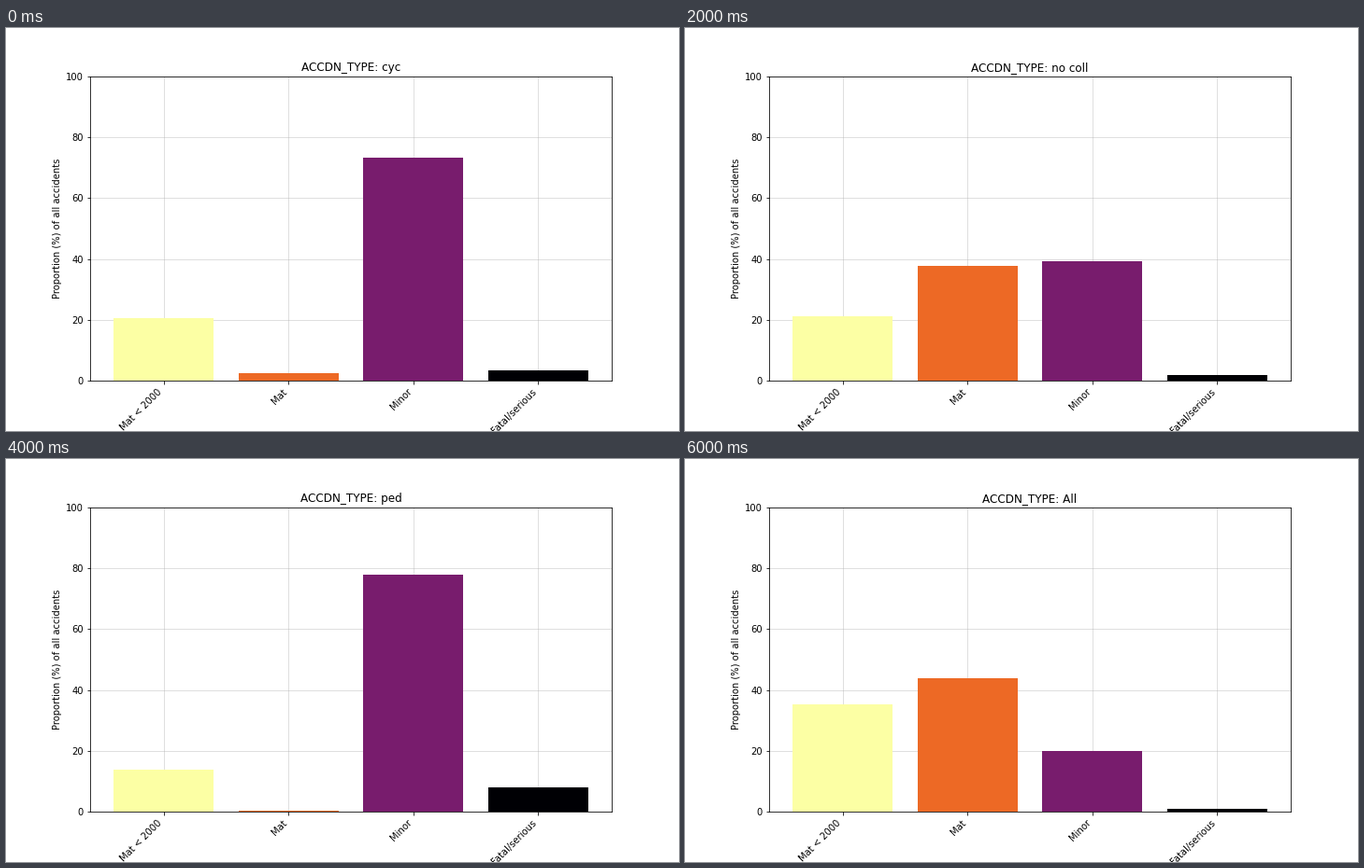
Animation of 720x432 px, one loop 7000 ms. Source, as a matplotlib script:

```python
import matplotlib.pyplot as plt
import numpy as np
from matplotlib.animation import FuncAnimation

SEVERITIES = ["Mat < 2000", "Mat", "Minor", "Fatal/serious"]

# Share of each severity (%) per accident type
SHARES = {
    "cyc": [20.5, 2.5, 73.3, 3.4],
    "fxd obj": [25.2, 58.3, 15.6, 1.2],
    "no coll": [21.2, 37.8, 39.3, 1.8],
    "oth": [48.1, 46.0, 5.2, 0.4],
    "ped": [13.8, 0.3, 77.9, 8.0],
    "veh": [38.7, 46.0, 15.0, 0.3],
    "All": [35.2, 43.9, 20.0, 0.9],
}
TYPES = list(SHARES)

fig, ax = plt.subplots(figsize=(10, 6), dpi=72, facecolor="white")
fig.subplots_adjust(left=0.125, right=0.9, bottom=0.125, top=0.88)

colors = plt.get_cmap("inferno_r")(np.linspace(0, 1, len(SEVERITIES)))
bars = ax.bar(range(len(SEVERITIES)), SHARES[TYPES[0]], color=colors)
title = ax.set_title("")

ax.set_ylim(0, 100)
ax.set_ylabel("Proportion (%) of all accidents")
ax.set_xticks(range(len(SEVERITIES)))
ax.set_xticklabels(SEVERITIES, rotation=45, ha="right")
ax.set_axisbelow(True)
ax.grid(alpha=0.5)


def update(i):
    kind = TYPES[i]
    title.set_text(f"ACCDN_TYPE: {kind}")
    for bar, share in zip(bars, SHARES[kind]):
        bar.set_height(share)
    return [title, *bars]


anim = FuncAnimation(fig, update, frames=len(TYPES), interval=1000,
                     repeat=True, repeat_delay=0)
plt.show()
```
